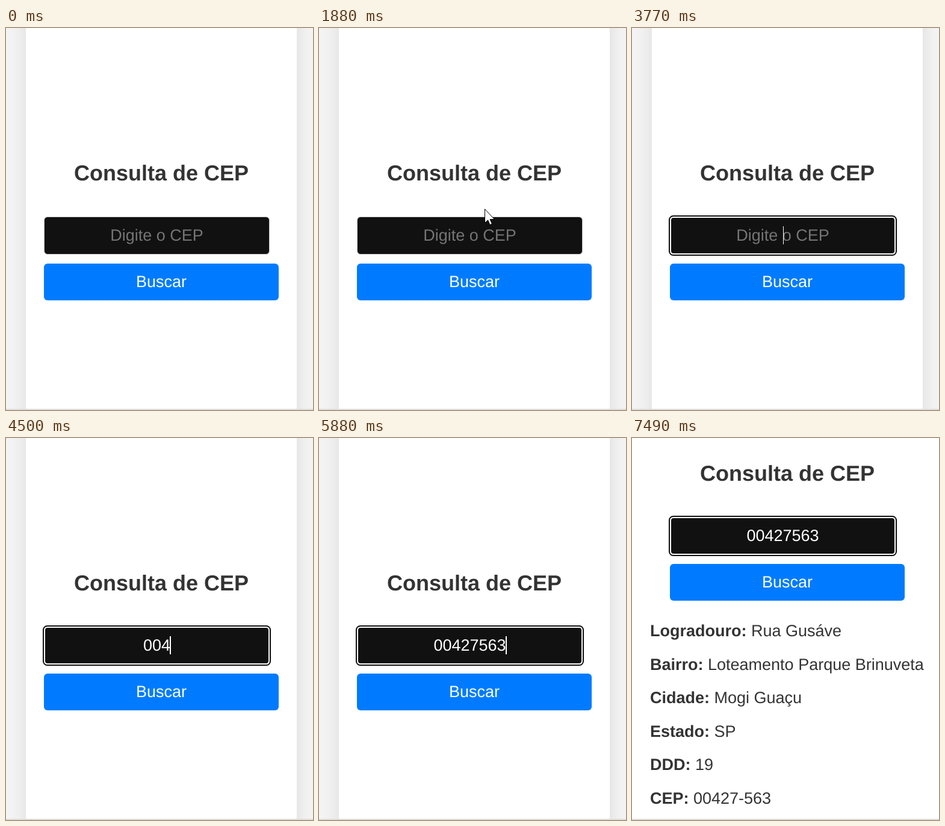
Write an HTML page that moves like this. It is 510 px wide and 634 px high and loops after 8 s.

```html
<!DOCTYPE html>
<html lang="pt-BR">
<head>
<meta charset="utf-8">
<title>Consulta de CEP</title>
<style>
  html, body { margin: 0; width: 100%; height: 100%; overflow: hidden; background: #f4f4f4; }
  svg { display: block; width: 510px; height: 634px; }
  text {
    font: 27px "Liberation Sans", Arial, Helvetica, sans-serif;
    text-rendering: geometricPrecision;
    fill: #333;
  }
  #form text { text-anchor: middle; }
  #form .title { font-size: 36px; font-weight: 700; }
  #form .value, #form .label { fill: #fff; }
  #form .hint { fill: #757575; }
  #card { fill: #fff; filter: drop-shadow(0 0 15px rgba(0, 0, 0, .1)); }
  .bold { font-weight: 700; }
</style>
</head>
<body>
<svg viewBox="0 0 510 634">
  <rect width="510" height="634" fill="#f4f4f4"/>
  <rect id="card" x="33" y="-60" width="450" height="760"/>
  <rect id="sheet" width="510" height="634" fill="#fff"/>

  <g id="form">
    <text class="title" x="258" y="253">Consulta de CEP</text>
    <rect x="63.5" y="313.5" width="374" height="62" rx="5.5" fill="#111" stroke="#ccc"/>
    <g id="ring" fill="none" stroke-width="2">
      <rect x="64" y="314" width="373" height="61" rx="5" stroke="#fff"/>
      <rect x="62" y="312" width="377" height="65" rx="6.5" stroke="#101010"/>
    </g>
    <text id="hint" class="hint" x="250.5" y="353">Digite o CEP</text>
    <text id="value" class="value" x="250.5" y="353"></text>
    <rect id="caret" y="329" height="30" fill="#fff"/>
    <rect x="63" y="391" width="390" height="61" rx="6" fill="#007bff"/>
    <text class="label" x="258" y="430">Buscar</text>
  </g>

  <g id="result"></g>
  <rect y="632" width="510" height="2" fill="#dedede"/>

  <path id="arrow" d="M.5 .5V23.5L5.6 18.8L9 26.6L12.4 25.1L9.1 17.5H16.4Z" fill="#fff" stroke="#000"/>
  <path id="beam" d="M-7 -11.5H-2L0 -10L2 -11.5H7M0 -10V10M-7 11.5H-2L0 10L2 11.5H7"
        fill="none" stroke="#fff" stroke-width="2"/>
  <circle id="click" cx="276" cy="345" r="18" fill="rgb(255,255,0)" fill-opacity=".5"/>
</svg>

<script>
const LOOP = 8000, STEP = 69, CLICK = 2690, SEARCH = 6280;
const CEP = '00427563';
const KEYS = [3970, 4170, 4500, 4770, 5030, 5360, 5620, 5880];
const BLINKS = [[3290, 3770], [6480, 6940], [7490, LOOP]];
const ROWS = [
  ['Logradouro', 'Rua Gusáve'],
  ['Bairro', 'Loteamento Parque Brinuveta'],
  ['Cidade', 'Mogi Guaçu'],
  ['Estado', 'SP'],
  ['DDD', '19'],
  ['CEP', CEP.slice(0, 5) + '-' + CEP.slice(5)]
];

const $ = id => document.getElementById(id);
const show = (id, on) => { $(id).style.display = on ? '' : 'none'; };
const mix = (a, b, k) => a + (b - a) * k;
const easeOut = k => 1 - (1 - k) ** 2;
const easeInOut = k => k * k * (3 - 2 * k);

$('result').innerHTML = ROWS.map(([name, text], i) =>
  `<text x="30" y="${Math.round(329 + 55.5 * i)}"><tspan class="bold">${name}:</tspan> ${text}</text>`
).join('');

// [start, end, from, to, easing]; the pointer rests at the end of each leg
const LEGS = [
  [1120, 1603, [328, 618], [283, 220], easeOut],
  [1603, 1879, [283, 220], [275, 300], easeInOut],
  [1879, 2290, [275, 300], [279.5, 346], easeOut]
];

function pointerAt(t) {
  if (t < 1120 || t >= 3090) return null;
  if (t >= 3020) return [383, 283];
  const s = 1120 + Math.floor((t - 1120) / STEP + 0.02) * STEP;
  const [start, end, from, to, ease] = LEGS.find(leg => s < leg[1]) || LEGS[2];
  const k = ease(Math.min(1, (s - start) / (end - start)));
  return [mix(from[0], to[0], k), mix(from[1], to[1], k)];
}

function drawPointer(t) {
  const p = pointerAt(t);
  const overInput = p && p[1] > 313 && p[1] < 376;
  show('arrow', p && !overInput);
  show('beam', overInput);
  if (p) $(overInput ? 'beam' : 'arrow').setAttribute('transform', `translate(${p})`);
  show('click', t >= CLICK && t < CLICK + 70);
}

function drawForm(t) {
  const n = KEYS.filter(k => t >= k).length;
  const done = t >= SEARCH;
  show('sheet', done);
  show('result', done);
  $('form').setAttribute('transform', `translate(0 ${done ? -182 : 0})`);

  show('ring', t >= CLICK);
  show('hint', !n);
  $('value').textContent = CEP.slice(0, n);
  show('caret', t >= CLICK && !BLINKS.some(([a, b]) => t >= a && t < b));
  $('caret').setAttribute('x', n ? Math.floor(250.2 + 7.5 * n) : 251);
  $('caret').setAttribute('width', n ? 2 : 1);
}

const origin = performance.now();
function tick() {
  const t = (performance.now() - origin) % LOOP;
  drawForm(t);
  drawPointer(t);
  requestAnimationFrame(tick);
}
tick();
</script>
</body>
</html>
```
